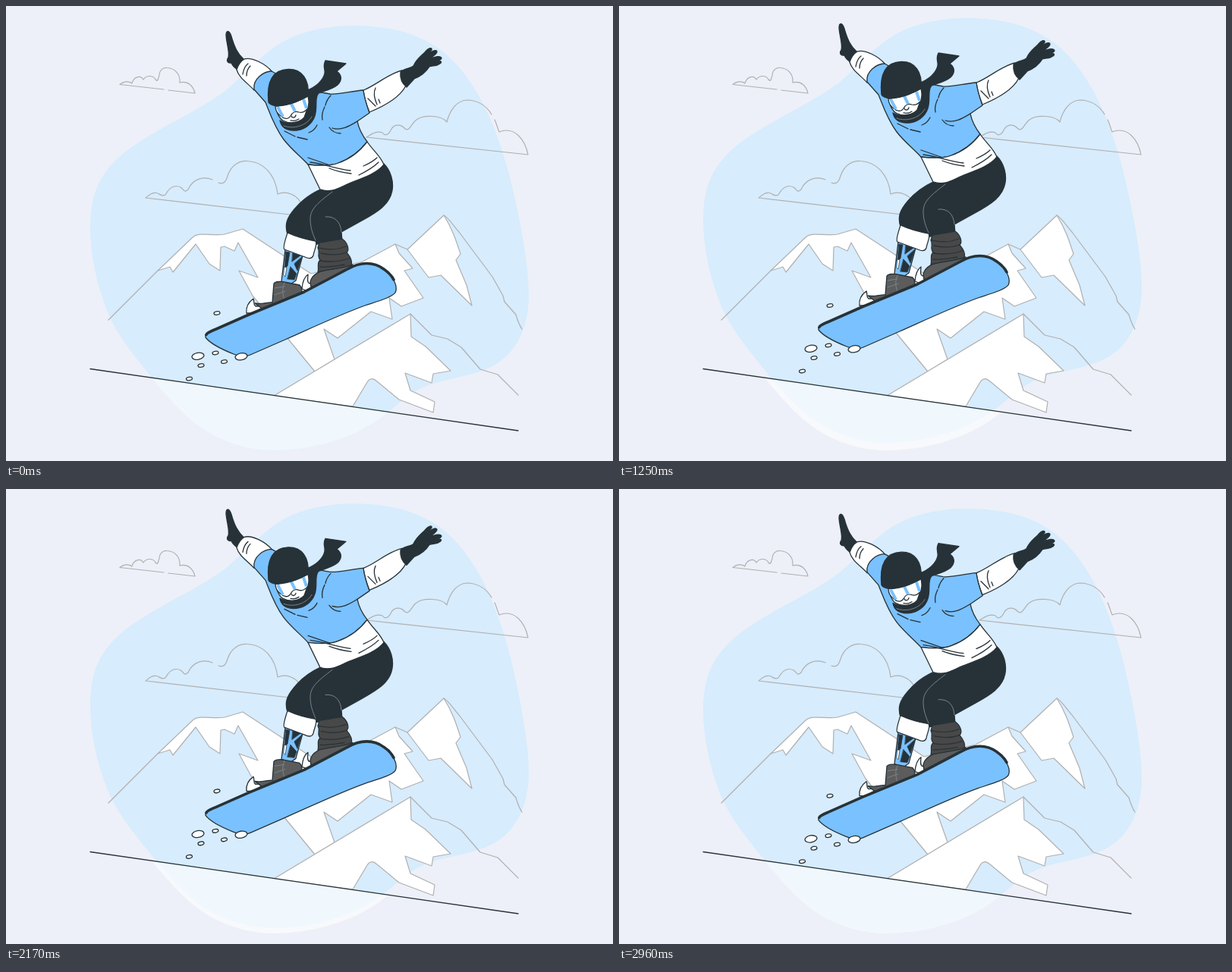
These frames come from a looping animation (800x600 px, 3000 ms). An HTML page:

```html
<!DOCTYPE html>
<html lang="en">
<head>
<meta charset="utf-8">
<title>Snowboarder</title>
<style>
html, body { margin: 0; width: 100%; height: 100%; overflow: hidden; background: #edf0f8; }
svg { display: block; width: 100vw; height: 100vh; }
path, ellipse { stroke-linejoin: round; stroke-linecap: round; }
.scene path { fill: none; stroke: #b0b0b0; stroke-width: 1.2; }
.scene .cap { fill: #fff; }
.rider path, .rider ellipse { fill: none; stroke: #263238; stroke-width: 1.3; }
.rider .white { fill: #fff; }
.rider .blue { fill: #7ac1ff; }
.rider .dark { fill: #263238; }
.rider .boot { fill: #5c5c5c; }
.rider .gaiter { fill: #484848; }
.rider .seam { stroke: #78848a; stroke-width: 1; }
.rider .stripe { stroke: #7ac1ff; stroke-width: 4; stroke-linecap: butt; }
.rider .edge { stroke-width: 3.6; }
.rider .thin { stroke-width: .7; }
</style>
</head>
<body>
<svg viewBox="0 0 800 600">
  <defs>
    <path id="blob" d="M111 292C111 250 122 222 155 194C195 162 252 140 290 111C320 86 345 52 385 38C410 29 435 26 458 26C510 26 555 38 588 71C630 114 649 172 662 218C675 268 689 338 689 380C689 430 668 466 630 480C595 493 563 492 535 511C520 521 508 533 490 546C455 570 405 586 350 586C295 584 255 560 225 528C212 514 202 503 192 490C165 456 148 436 134 404C120 368 111 330 111 292Z"/>
    <clipPath id="slope"><path d="M111 478.5L675 560V600H111Z"/></clipPath>
  </defs>
  <rect width="800" height="600" fill="#edf0f8"/>
  <use id="sky" href="#blob" fill="#d7ecfd"/>

  <g class="scene">
    <!-- clouds -->
    <path d="M208 110L150 103.500C154 100 161 98 166 102C168 94 177 90 181 97C185 91 194 91 197 97C201 101 200 95 202 92C202 85 207 81 212 81.500C223 82 230 90 229 101C240 98 247 106 249 115L214 111"/>
    <path d="M378 275.500L184 253C189 249 192 246 198 246.500C203 247 204 252 210 249C215 240 222 235 230 239C235 242 234 247 240 242C246 228 260 224 272 229M280 233C287 236 290 231 292 224C297 209 308 204 318 204.500C339 205 355 222 358 248C370 243 384 249 390 262"/>
    <path d="M640 143C634 133 623 124 607 124C594 125 585 137 581 153C575 144 550 143 541 150C534 155 532 166 526 162C520 155 512 156 508 162C503 173 498 170 496 167C488 164 482 169 475 173L688 196C684 176 670 158 650 166C648 162 647 156 644 150"/>
    <!-- far range -->
    <path d="M135 414L200 349M513 314L529 321"/>
    <path class="cap" d="M200 349L246 305C255 297 274 304 288 301L312 294L402 353L470 337L513 314L518 326L536 346L525 349L550 385L521 396L505 385L509 413L481 403L437 438L419 426L433 466L407 482L325 382L307 349L332 358L306 312L301 323L288 317L283 318L282 349L268 340L250 314L220 351L216 344Z"/>
    <path class="cap" d="M577 276L529 321L557 358L573 355L614 395L607 368L593 335L599 327C594 312 589 295 577 276Z"/>
    <path d="M577 276C583 279 590 290 597 298L641 357L655 382L657 390L672 407C674 414 676 420 680 426"/>
    <!-- near range -->
    <path class="cap" d="M353 514L533 406L534 436L553 449L586 481L563 485L561 497L526 484L533 507L565 522L563 536L518 519L489 495C483 490 479 491 476 496L457 528Z"/>
    <path d="M533 406L561 434L582 439L600 450L625 479L648 486L675 513"/>
  </g>

  <use href="#blob" clip-path="url(#slope)" fill="#fff" opacity=".63"/>
  <path d="M111 478.500L675 560" stroke="#263238" stroke-width="1.300"/>

  <g class="rider" id="rider">
    <!-- left arm -->
    <path class="dark" d="M290 39C290 32 294 31 297 40C301 54 305 63 314 71L305 84C301 81 298 78 297 75C292 76 290 72 293 68C295 61 291 51 290 39Z"/>
    <path class="white" d="M314 70C324 67 342 76 351 87L327 111C319 102 307 95 304 84C306 78 309 73 314 70Z"/>
    <path d="M319 76C315 79 313 84 312 90M322 79C318 83 317 87 317 92"/>
    <!-- right arm -->
    <path class="white" d="M471 111C487 105 504 89 522 85L527 105C520 119 501 131 479 140C475 130 472 120 471 111Z"/>
    <path d="M487 108C484 114 485 121 489 130M477 122L487 132M491 123L493 128"/>
    <path class="dark" d="M520 87C526 81 533 83 537 79C541 70 546 67 552 61C557 55 562 54 561 58L554 65C561 59 567 57 568 60C568 64 563 65 560 69C566 67 573 65 574 69C573 72 569 72 566 74C574 71 575 74 572 76C567 80 563 78 558 80C553 88 546 93 538 96L528 107C523 103 519 96 520 87Z"/>

    <!-- pants -->
    <path class="dark" d="M414 242C430 245 440 239 452 234C470 227 489 220 498 208C507 217 511 231 509 243C506 262 489 272 469 283L442 298L443 310L409 314L371 301C367 288 370 280 380 268C389 257 401 248 414 242Z"/>
    <path class="seam" d="M430 245C412 259 401 267 401 281C401 293 405 302 408 309M421 278C433 277 441 284 442 298"/>

    <!-- far leg -->
    <path class="blue" d="M368 321L391 329L382 362L375 367L363 363Z"/>
    <path class="dark thin" d="M369 324L374 325L371 343L367 346ZM378 326L388 329L377 337ZM390 331L384 349L380 340ZM375 344L383 353L380 361L371 360Z"/>
    <path class="white thin" d="M367 344L370 345L368 357L366 355Z"/>
    <path class="white" d="M371 299C384 305 396 308 408 310C411 314 406 322 405 329C403 334 398 333 394 331L367 321C364 319 369 306 371 299Z"/>
    <path class="white" d="M317 405C316 397 319 391 326 386C328 390 325 393 329 396L343 395L325 405Z"/>
    <path class="boot" d="M328 392C337 394 345 390 351 391L353 366C355 363 363 363 367 364L387 368C391 372 390 377 389 379L340 401Z"/>
    <path class="seam" d="M354 372L367 370M354 381L368 376M367 365C363 374 365 382 368 390"/>

    <!-- near leg -->
    <path class="white" d="M390 373C391 361 395 356 398 354C398 359 396 364 400 366L414 362L398 376Z"/>
    <path class="boot" d="M401 364C403 354 414 348 430 347L457 341L452 349L402 371Z"/>
    <path class="gaiter" d="M413 312L443 307C450 312 453 321 449 325C454 331 457 337 455 342C442 346 426 347 411 351C413 344 409 339 414 335C409 329 415 325 411 319Z"/>
    <path d="M412 319C424 322 438 321 448 317M415 326C428 329 438 329 449 325M414 336C427 338 440 337 452 333M414 344C426 345 438 342 446 341"/>

    <!-- board -->
    <path class="blue" d="M263 434C264 430 271 428 277 426L320 407L393 377L450 347C467 337 485 337 498 347C511 357 517 370 513 378C509 384 491 389 473 395C440 407 406 423 370 439L322 460C314 464 307 462 300 459C285 453 269 445 263 437Z"/>
    <path class="edge" d="M264 433.500C265 430.500 271 428.500 277 426L320 407L393 377L450 347C467 337 485 337 498 347C504 351 508 355 511 361"/>

    <!-- jersey -->
    <path class="blue" d="M350 86C340 86 325 96 327 110L342 127C348 142 354 160 366 176C376 189 389 199 398 209C415 211 428 211 438 207C455 201 466 192 476 179C469 170 465 162 463 152L479 141C475 130 472 120 471 111C455 112 440 117 427 116L395 110Z"/>
    <path class="white" d="M398 209L414 242C430 247 440 239 452 234C470 227 489 221 498 209C493 197 484 191 476 179C466 192 455 201 438 207C428 211 415 211 398 209Z"/>
    <path d="M428 118C424 122 422 126 421 131M420 133C417 139 416 145 417 150M367 165L381 172M384 173L397 176M399 167C405 165 408 161 410 157M463 152C453 158 442 165 430 161M426 160C430 166 436 168 441 168M398 200L427 210M401 206C418 208 436 215 454 217M426 214C436 218 446 220 455 221M465 223C475 218 484 213 491 206M471 211C478 208 484 205 489 200"/>

    <!-- head -->
    <path class="dark" d="M395 112C409 107 418 98 420 89C421 82 417 80 421 72L448 76L436 86C444 92 442 99 437 104C430 110 419 112 412 115C406 121 411 133 407 145C403 157 392 163 383 164C371 165 363 161 361 151C374 158 391 154 398 136Z"/>
    <path class="seam" d="M366 158C379 163 396 158 403 146"/>
    <path class="white" d="M356 136C358 143 361 149 365 151C374 156 387 154 393 147L399 130Z"/>
    <path d="M375 151C379 152 383 151 386 149M376 145C377 148 381 148 382 144"/>
    <path class="white" d="M355 132C370 131 388 125 398 119C400 127 399 132 397 136C393 140 389 141 386 140C381 138 377 141 375 145C372 150 366 149 362 145C358 142 355 138 355 132Z"/>
    <path class="stripe" d="M358 133L365 146M376 129L381 139M392 123L396 135"/>
    <path class="dark" d="M346 127C343 99 352 84 372 83.500C390 83 400 97 398 118C390 124 375 131 357 132C351 131 347 129 346 127Z"/>
    <g id="snow"></g>
  </g>
</svg>
<script>
const LOOP = 3000, LIFT = 12;
const sky = document.getElementById('sky');
const rider = document.getElementById('rider');

// x, y, horizontal radius
const flakes = [[278, 405, 4], [253, 461.7, 8], [276, 457.5, 4], [257, 474, 4], [287.5, 469, 4], [241.5, 491.5, 4], [310, 462.3, 8]];
document.getElementById('snow').innerHTML = flakes.map(([x, y, r]) =>
  `<ellipse class="white" cx="${x}" cy="${y}" rx="${r}" ry="${r * 0.56}" transform="rotate(-10 ${x} ${y})"/>`).join('');

function draw(time) {
  const phase = (time % LOOP) / LOOP;
  const rise = LIFT * (1 - Math.abs(1 - 2 * phase));
  for (const part of [sky, rider]) part.setAttribute('transform', `translate(0 ${-rise})`);
}

function tick() {
  draw(performance.now());
  requestAnimationFrame(tick);
}
tick();
</script>
</body>
</html>
```
